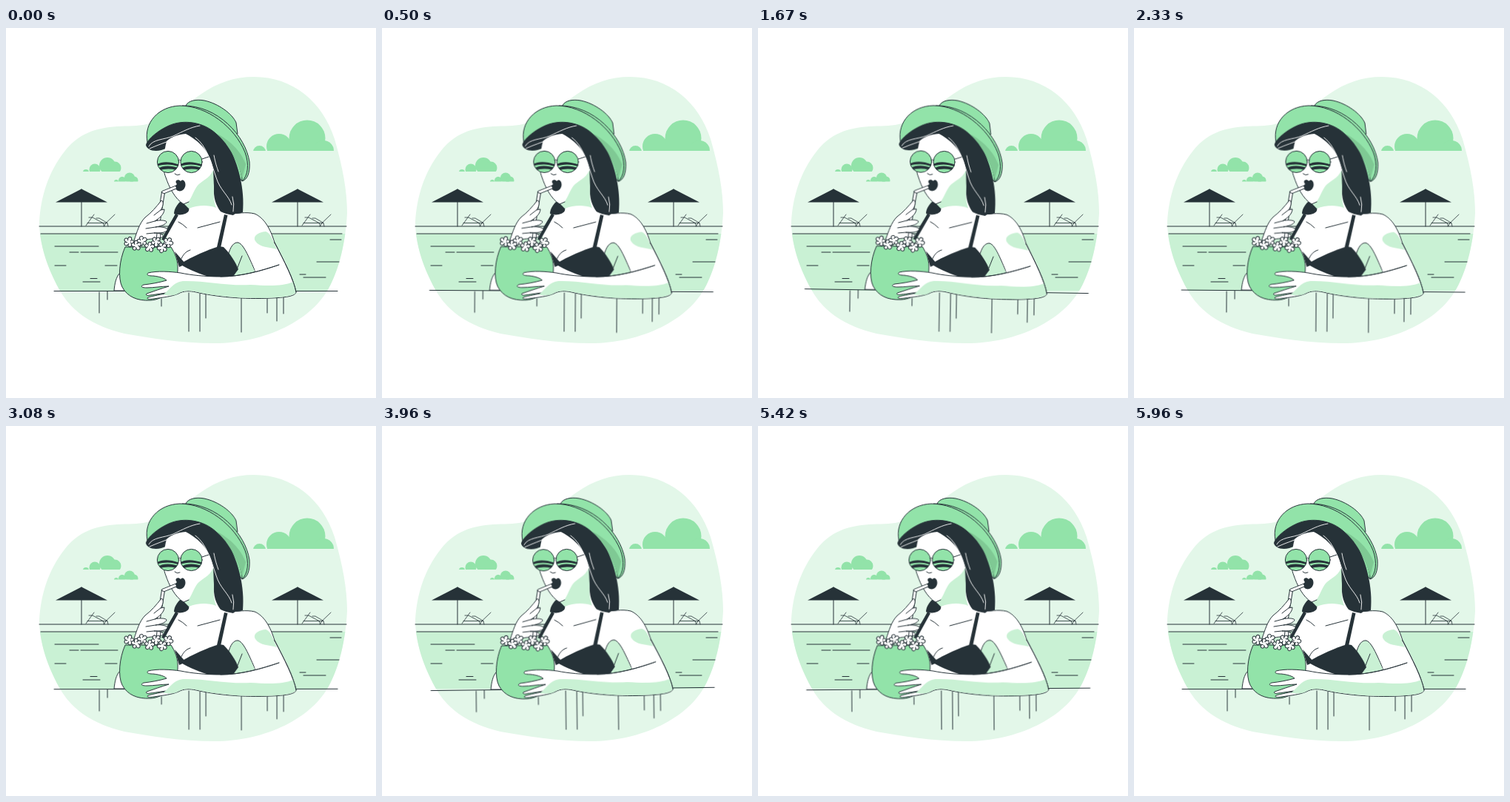
An HTML page that plays this animation: 500 px wide and 500 px high, repeating every 6000 ms.

```html
<!DOCTYPE html>
<html lang="en">
<head>
<meta charset="utf-8">
<title>Poolside drink</title>
<style>
  html, body { margin: 0; width: 100%; height: 100%; overflow: hidden; background: #fff; }
  svg { display: block; width: 100vw; height: 100vh; }
  #swimmer { transform-origin: 250px 250px; }
  .line { fill: none; stroke: #263238; stroke-width: 1; stroke-linecap: round; stroke-linejoin: round; }
  .shine { fill: none; stroke: #fff; stroke-width: .9; stroke-linecap: round; }
  .skin { fill: #fff; stroke: #263238; stroke-width: 1; stroke-linejoin: round; }
  .leaf { fill: #92e3a9; stroke: #263238; stroke-width: 1; stroke-linejoin: round; }
  .green { fill: #92e3a9; }
  .pale { fill: #c9f1d4; }
  .dark { fill: #263238; }
  .white { fill: #fff; }
</style>
</head>
<body>
<svg viewBox="0 0 500 500">
  <defs>
    <path id="blob" d="M335 66C388 66 428 100 444 150C455 188 461 220 461 250C459 290 450 325 438 348C415 395 350 426 282 426C235 426 195 419 160 413C115 402 90 382 76 360C55 325 45 290 45 262C47 228 57 195 79 167C98 142 122 135 150 133C165 132 178 133 190 130C225 122 243 103 264 89C286 74 308 66 335 66Z"/>
    <clipPath id="inBlob"><use href="#blob"/></clipPath>
    <clipPath id="lens"><circle r="14.6"/></clipPath>
    <clipPath id="bigBase"><rect x="330" y="115" width="120" height="51"/></clipPath>
    <clipPath id="midBase"><rect x="100" y="165" width="60" height="29"/></clipPath>
    <clipPath id="tinyBase"><rect x="140" y="190" width="40" height="17.500"/></clipPath>
    <g id="shade">
      <path class="dark" d="M67 235.500L102 217.500L137 235.500Z"/>
      <path class="line" d="M102 218V268"/>
      <path class="line" style="stroke-width:.8" d="M119 252L108 267M112 256H117L131 263.500H110M131 263.500L133 268M147 252L135 263.500L132 268M122 257H126L137 263.500H131M137 263.500L138 268"/>
    </g>
    <g id="glass">
      <circle class="green" r="14.6"/>
      <g clip-path="url(#lens)">
        <path class="dark" d="M-16 4C-9 -1 2 -1 16 4V7C4 2 -6 3 -16 6Z"/>
        <path class="dark" d="M-14 9C-6 4 5 5 14 8L11 11C3 9 -5 9 -12 12Z"/>
      </g>
      <circle class="line" r="14.6"/>
    </g>
    <g id="flower"></g>
  </defs>

  <use href="#blob" fill="#e3f7e9"/>
  <g class="green">
    <g clip-path="url(#bigBase)">
      <circle cx="342.500" cy="167.500" r="8.5"/>
      <circle cx="369" cy="160" r="17"/>
      <circle cx="407" cy="149" r="24.5"/>
      <circle cx="429" cy="166" r="14"/>
      <rect x="354" y="158" width="76" height="8"/>
    </g>
    <g clip-path="url(#midBase)">
      <circle cx="108" cy="195" r="4"/>
      <circle cx="120" cy="191" r="7.5"/>
      <circle cx="137" cy="186" r="11"/>
      <circle cx="147" cy="189" r="8.5"/>
    </g>
    <g clip-path="url(#tinyBase)">
      <circle cx="149" cy="208" r="3"/>
      <circle cx="157" cy="206" r="5"/>
      <circle cx="167" cy="202.500" r="7"/>
      <circle cx="173" cy="206" r="5.5"/>
    </g>
  </g>
  <use href="#shade"/>
  <use href="#shade" x="292"/>
  <g clip-path="url(#inBlob)"><rect class="pale" x="40" y="278" width="425" height="77"/></g>
  <path class="line" d="M45 268H460M47 278H454M66 295H125M86 303H98M101 303H151M66 321H81M134 321H150M114 338.500H123M104 343H127M438 286H453M420 316H450M397 333H405M402 337H432"/>

  <g id="swimmer">
    <path class="line" d="M65 355.500H448M126 357V385M137 356V367M210 366V376M247 358V410M262 359V410M270 358V392M318 364V411M353 365V385M366 365V396M375 363V386"/>

    <!-- raised forearm behind the coconut -->
    <path class="skin" d="M146 355C147 344 149 337 153 332L175 330V355Z"/>

    <!-- torso and upper arm -->
    <path class="white" d="M247 230C246 246 238 251 229 253L216 274L224 320L240 345H388C386 330 370 302 363 290C357 270 348 256 336 251C324 248 312 251 302 251L283 225Z"/>
    <path class="pale" d="M300 309C303 295 308 289 314 290C322 293 328 311 337 330L306 337L314 325Z"/>
    <path class="line" d="M229 253L216 274M302 251C312 251 324 248 336 251C348 256 357 270 363 290M233 262Q239 265 244 270M259 270L289 262M236 314C239 306 243 302 249 300M300 308C303 295 308 289 314 290C322 293 329 312 337 329M319 308L312 326"/>
    <path class="dark" d="M229 251L233 253L214 287L210 286ZM295 252L299.500 253L290 297L285 296ZM228 302L243 319L234 323Z"/>
    <path class="dark" d="M235 319C253 308 272 300 288 295L294 296C303 305 310 316 314 326L306 337H278C263 333 248 327 235 319Z"/>

    <path class="dark" d="M235 235C229 241 227 247 227 251C235 254 244 252 247 247L248 238Z"/>

    <!-- hat crown and brim rim -->
    <path class="leaf" d="M243 105C246 98 257 96 268 98C287 102 306 116 311 128L313 143L290 160Z"/>
    <path class="leaf" d="M238 105C286 104 324 146 329 181C330 196 326 205 319 207L280 160Z"/>

    <!-- hair, then face over it -->
    <path class="dark" d="M189 158C193 145 214 130 238 125C263 121 287 138 301 160C314 184 323 218 320 249C315 252 311 249 307 253C300 252 294 250 290 248C284 240 280 230 281 215L272 170L243 147C229 151 222 162 210 165C199 168 190 164 189 158Z"/>
    <path class="pale" d="M280 190L281 215C280 226 281 235 284 243C271 238 258 240 247 244L240 237L262 205Z"/>
    <path class="white" d="M217 153C213 168 212 187 216 202C220 214 228 231 240 238C249 238 251 224 258 214C264 206 275 204 280 192C278 175 268 156 243 143C231 144 222 148 217 153Z"/>
    <path class="line" d="M213 174C212 186 213 195 216 202C220 214 228 231 240 238L247 235"/>
    <path class="shine" d="M193 160C198 150 214 151 226 146C239 140 249 134 262 132M194 163C205 158 215 155 224 151M256 148C271 159 277 181 284 202C289 219 301 226 305 239M281 172C283 183 285 188 287 194M306 228Q309 238 307 248"/>

    <path class="leaf" d="M191 154C186 128 206 106 235 105C272 105 309 134 323 168C329 184 327 200 319 207C319 188 303 158 284 143C267 127 240 123 220 132C207 138 198 145 191 154Z"/>
    <path fill="#7fc994" d="M285 143C302 151 318 167 324 184L319 204C316 186 302 158 285 143Z"/>

    <!-- face details -->
    <use href="#glass" x="219" y="181"/>
    <use href="#glass" x="250.500" y="181"/>
    <path class="line" d="M233 179Q234.500 177 236 179M265 177L274 174M228 197Q231 200 235 198"/>
    <path class="dark" d="M236 207C232 203 227 207 231 211L228 214C229 220 235 222 239 219C244 215 243 208 240 206C238 205 237 206 236 207Z"/>

    <!-- straw -->
    <path class="line" style="stroke-width:5;stroke-linecap:butt" d="M230 215L212.500 222L202 288"/>
    <path class="line" style="stroke:#fff;stroke-width:3;stroke-linecap:butt" d="M229.500 215.200L212.500 222L202 288"/>
    <path class="line" d="M210 222L214 224"/>

    <path class="leaf" d="M161 296C153 314 151 338 157 350C164 363 177 369 195 368C215 367 231 350 232 328C233 314 228 304 223 296Z"/>

    <!-- hand on the straw -->
    <path class="skin" d="M173 287C177 276 180 264 188 256C196 250 203 242 210 233C214 234 212 242 209 246L214 245C214 252 206 258 201 261C207 259 217 260 217 262C216 266 208 268 202 269C209 268 219 270 218 273C216 277 207 277 200 277C207 277 214 279 212 282C207 286 197 284 190 286L185 291Z"/>
    <path class="line" d="M209 246L200 253M201 261L190 264M202 269L189 271M200 277L190 278M204 278L203 287M209 278L208 287"/>
    <g id="blooms"></g>

    <!-- resting arm -->
    <path class="skin" d="M369 320C345 328 318 336 290 336C270 336 250 334 236 331C222 329 204 328 192 331C189 334 193 335 199 335C208 336 214 338 217 341C207 344 195 346 186 347C181 349 183 351 190 351C200 351 210 349 220 349C210 352 199 356 190 359C188 361 191 362 195 361C204 360 213 358 219 358C210 360 199 362 192 364C189 366 193 367 199 366C212 364 224 363 233 359C240 355 248 355 257 357C282 363 320 367 360 365C380 364 391 362 392 357C389 340 376 315 363 290L350 300Z"/>
    <path class="white" d="M369 319.500L337 329L330 307L340 270L362 290L381 332Z"/>
    <path class="pale" d="M351 275C341 276 333 281 337 288C343 297 356 296 366 299L362 290C360 285 357 277 351 275Z"/>
    <path class="pale" d="M388.500 343C372 350 350 348 330 347C300 349 268 341 239 342C225 344 221 354 212 361C224 362 229 361 233 358.500C240 354.500 248 354.500 257 356.500C282 362.500 320 366.500 360 364.500C380 363.500 391 361 391.500 357Z"/>
    <path class="line" d="M369 320C345 328 318 336 290 336M363 290C376 315 389 340 392 357"/>
  </g>
</svg>
<script>
  const NS = 'http://www.w3.org/2000/svg';
  const byId = id => document.getElementById(id);
  const add = (parent, tag, attrs) => {
    const el = document.createElementNS(NS, tag);
    for (const key in attrs) el.setAttribute(key, attrs[key]);
    parent.append(el);
  };

  const petals = 5;
  for (let i = 0; i < petals; i++) {
    const angle = i / petals * 360;
    add(byId('flower'), 'ellipse', {
      class: 'skin', rx: 3, ry: 2.5, cx: 3.8, transform: `rotate(${angle})`
    });
  }
  add(byId('flower'), 'circle', { class: 'white', r: 2.2 });

  const blooms = [[166, 289], [184, 288], [219, 290], [176, 294], [203, 289], [194, 296], [211, 297]];
  blooms.forEach(([x, y], i) => add(byId('blooms'), 'use', {
    href: '#flower', transform: `translate(${x} ${y}) rotate(${i * 41})`
  }));

  // Gentle sway about the middle of the stage
  const sway = [[0, 0], [.25, 1], [.75, -1], [1, 0]];
  byId('swimmer').animate(
    sway.map(([offset, deg]) => ({ offset, transform: `rotate(${deg}deg)` })),
    { duration: 6000, iterations: Infinity, easing: 'linear' }
  );
</script>
</body>
</html>
```
